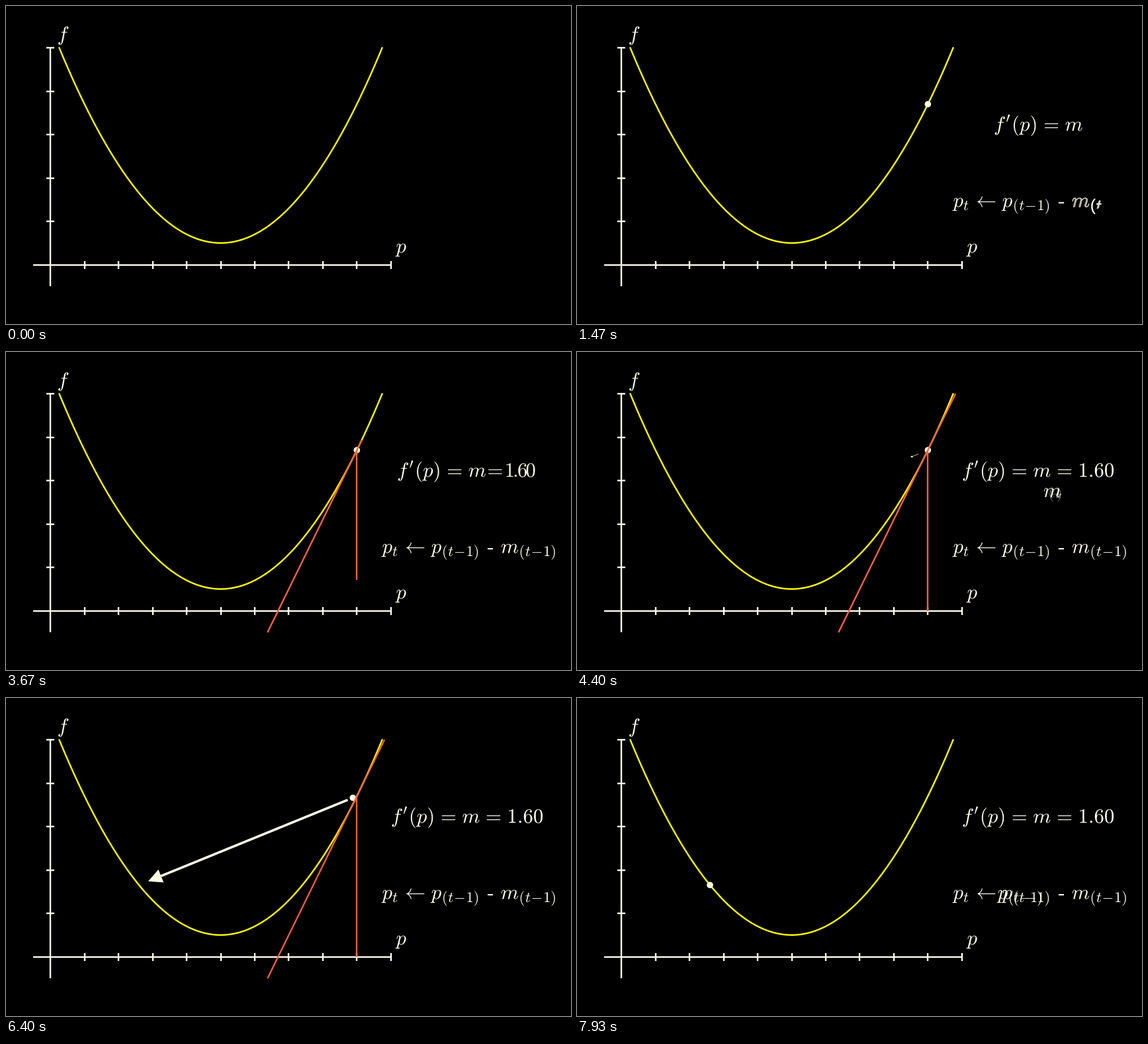
A matplotlib script that plays this animation: 854x480 px, repeating every 8 s.

```python
import math

import matplotlib
import numpy as np
import matplotlib.pyplot as plt
from matplotlib.animation import FuncAnimation
from matplotlib.patches import Circle, PathPatch, Polygon
from matplotlib.path import Path
from matplotlib.textpath import TextPath
from matplotlib.transforms import Affine2D

matplotlib.rcParams["mathtext.fontset"] = "cm"

WIDTH, HEIGHT, DPI = 854, 480, 64
LOOP, FRAMES = 8000, 200
STEP = LOOP // FRAMES
PX = 72 / DPI

WHITE, YELLOW, RED = "#ffffe6", "#ffff00", "#fc623e"
STROKE = 2.4
EM, SMALL = 30.8, 0.73
DOT_RADIUS = 4.8

fig = plt.figure(figsize=(WIDTH / DPI, HEIGHT / DPI), dpi=DPI, facecolor="black")
ax = fig.add_axes([0, 0, 1, 1])
ax.set_xlim(-0.5, WIDTH - 0.5)
ax.set_ylim(HEIGHT - 0.5, -0.5)
ax.axis("off")


def to_px(p, f):
    return np.array([66.7 + 51.46 * p, 390 - 65.5 * f])


def parabola(p):
    return 0.5 + 0.2 * (p - 5) ** 2


def smooth(t):
    t = min(max(t, 0), 1)
    edge = 1 / (1 + math.exp(5))
    value = 1 / (1 + math.exp(-10 * (t - 0.5)))
    return min(max((value - edge) / (1 - 2 * edge), 0), 1)


def progress(now, start, duration):
    return smooth((now - start) / duration)


def lerp(a, b, u):
    return a + (b - a) * u


# ---- glyphs -------------------------------------------------------------

BEARING = {"=": 0.056, r"\leftarrow": 0.057, "-": 0.083}
shapes = {}


def shape(tex, scale):
    """Outline of one symbol with its origin at the baseline, y upwards."""
    key = tex, scale
    if key not in shapes:
        size = EM * scale
        if tex == "hyphen":
            x0, x1, y0, y1 = np.array([0.011, 0.29, 0.187, 0.247]) * size
            path = Path([(x0, y0), (x1, y0), (x1, y1), (x0, y1), (x0, y0)],
                        closed=True)
        else:
            text = TextPath((0, 0), f"${tex}$", size=size)
            path = Path(text.vertices, text.codes)
            if tex in BEARING:
                shift = BEARING[tex] * size - path.get_extents().x0
                path = path.transformed(Affine2D().translate(shift, 0))
        shapes[key] = path
    return shapes[key]


def row(symbols, x, y):
    """Place (tex, offset, scale, rise) symbols, given in em, on a baseline."""
    return [(tex, scale, np.array([x + dx * EM, y - rise * EM]))
            for tex, dx, scale, rise in symbols]


def subscript(start):
    parts = zip(["(", "t", "-", "1", ")"], [0.01, 0.315, 0.6, 1.2, 1.56])
    return [(tex, start + dx, SMALL, -0.15) for tex, dx in parts]


SLOPE = [("f", 0, 1, 0), (r"\prime", 0.6, 0.7, 0.413), ("(", 0.878, 1, 0),
         ("p", 1.267, 1, 0), (")", 1.77, 1, 0), ("=", 2.437, 1, 0),
         ("m", 3.493, 1, 0)]
VALUE = [("=", 4.649, 1, 0), ("1", 5.705, 1, 0), (".", 6.205, 1, 0),
         ("6", 6.483, 1, 0), ("0", 6.983, 1, 0)]
UPDATE = ([("p", 0, 1, 0), ("t", 0.503, SMALL, -0.15),
           (r"\leftarrow", 1.132, 1, 0), ("p", 2.41, 1, 0)]
          + subscript(2.925)
          + [("hyphen", 5.153, 1, 0), ("m", 5.825, 1, 0)] + subscript(6.71))

slope_wide = row(SLOPE, 629.5, 188)
slope_left = row(SLOPE, 581.3, 188)
value_row = row(VALUE, 581.3, 188)
update_row = row(UPDATE, 568, 303)
previous_p, last_m = update_row[3:9], update_row[10:]


# ---- drawing ------------------------------------------------------------

live = []


def keep(artist):
    live.append(artist)
    return artist


def draw_glyph(glyph, at=None, alpha=1, border=0):
    tex, scale, home = glyph
    x, y = home if at is None else at
    path = shape(tex, scale).transformed(Affine2D().scale(1, -1).translate(x, y))
    patch = PathPatch(path, facecolor=WHITE, edgecolor=WHITE,
                      lw=border * PX, alpha=alpha, zorder=5)
    return keep(ax.add_patch(patch))


def draw_row(glyphs):
    for glyph in glyphs:
        draw_glyph(glyph)


def draw_outline(glyph, u):
    tex, scale, (x, y) = glyph
    for points in shape(tex, scale).to_polygons():
        part = points[:max(2, round(len(points) * u))]
        draw_line(x + part[:, 0], y - part[:, 1], WHITE, 1.2, 5)


def draw_line(xs, ys, color, width=STROKE, zorder=4, alpha=1):
    line, = ax.plot(xs, ys, color=color, lw=width * PX, zorder=zorder,
                    alpha=alpha, solid_capstyle="butt")
    return keep(line)


def draw_dot(center, radius=DOT_RADIUS, alpha=1):
    keep(ax.add_patch(Circle(center, radius, color=WHITE, lw=0,
                             alpha=alpha, zorder=3)))


def write(glyphs, u, lag=0.2):
    """Trace each border, then fill it, one symbol after another."""
    head = u * (1 + lag * (len(glyphs) - 1))
    for i, glyph in enumerate(glyphs):
        own = min(head - lag * i, 1)
        if own >= 0.5:
            fill = 2 * own - 1
            draw_glyph(glyph, alpha=lerp(0.5, 1, fill), border=1.2 * (1 - fill))
        elif own > 0:
            draw_outline(glyph, 2 * own)


def spread(glyphs, origin, u):
    """Symbols fan out of one point to their places while fading in."""
    for glyph in glyphs:
        draw_glyph(glyph, lerp(origin, glyph[2], u), alpha=min(1, 0.15 + u))


def draw_partial(a, b, u, alpha):
    end = lerp(a, b, u)
    draw_line([a[0], end[0]], [a[1], end[1]], RED, alpha=alpha)


def draw_arrow(a, b, u, alpha):
    direction = (b - a) / np.hypot(*(b - a))
    normal = np.array([-direction[1], direction[0]])
    length = np.hypot(*(b - a)) * u
    tip = min(21, length / 4)
    point = a + direction * length
    base = point - direction * tip
    width = min(3.6, length / 20)
    draw_line([a[0], base[0]], [a[1], base[1]], WHITE, width, 6, alpha)
    corners = [point, base + normal * tip / 2, base - normal * tip / 2]
    keep(ax.add_patch(Polygon(corners, color=WHITE, lw=0, alpha=alpha, zorder=6)))


# ---- fixed parts --------------------------------------------------------

def draw_graph():
    ox, oy = to_px(0, 0)
    right, top = to_px(10, 5)
    left, bottom = to_px(-0.5, -0.5)
    draw_line([left, right + 1], [oy, oy], WHITE, zorder=1)
    draw_line([ox, ox], [bottom, top - 1], WHITE, zorder=1)
    for i in range(1, 11):
        x = to_px(i, 0)[0]
        draw_line([x, x], [oy - 6, oy + 6], WHITE, zorder=1)
    for i in range(1, 6):
        y = to_px(0, i)[1]
        draw_line([ox - 6, ox + 6], [y, y], WHITE, zorder=1)
    p = np.linspace(0.25, 9.75, 200)
    draw_line(*to_px(p, parabola(p)), YELLOW, zorder=2)
    draw_row(row([("f", 0, 1, 0)], 77, 52) + row([("p", 0, 1, 0)], 589, 372))


draw_graph()
live.clear()

old_dot = to_px(9, parabola(9))
new_dot = to_px(2.6, parabola(2.6))
foot = to_px(9, 0)
tangent_low = to_px(9 - 4.2 / 1.6, -0.5)
tangent_high = to_px(9 + 1.3 / 1.6, 5)
gap = 15 * (new_dot - old_dot) / np.hypot(*(new_dot - old_dot))


# ---- timeline -----------------------------------------------------------

def draw_slope(now):
    u = progress(now, 3000, 1000)
    if now < 3000:
        write(slope_wide, progress(now, 0, 930))
        return
    for glyph, target in zip(slope_wide, slope_left):
        draw_glyph(glyph, lerp(glyph[2], target[2], u))
    if u > 0:
        spread(value_row, slope_wide[-1][2], u)


def draw_update(now):
    if now < 1870:
        write(update_row, progress(now, 870, 1000))
        return
    draw_row(update_row)
    if 4000 < now < 5000:
        u = progress(now, 4000, 1000)
        source = slope_left[-1][2]
        draw_glyph(last_m[0], lerp(source, last_m[0][2], u))
        spread(last_m[1:], source, u)
    if now > 7200:
        u = progress(now, 7200, 1000)
        draw_glyph(previous_p[0], lerp(update_row[0][2], previous_p[0][2], u))
        spread(previous_p[1:], update_row[1][2], u)


def draw_dots(now):
    if now < 7270:
        move = progress(now, 6267, 1000)
        radius = DOT_RADIUS * progress(now, 0, 930)
        draw_dot(lerp(old_dot, new_dot, move), radius)
    if now > 6267:
        draw_dot(new_dot, alpha=progress(now, 6200, 800))


def draw_step(now):
    u = progress(now, 3000, 1000)
    alpha = 1 - progress(now, 6200, 930)
    if u > 0 and alpha > 0:
        draw_partial(tangent_low, tangent_high, u, alpha)
        draw_partial(old_dot, foot, u, alpha)
    grown = progress(now, 4000, 2000)
    shown = 1 - progress(now, 7200, 720)
    if grown > 0 and shown > 0:
        draw_arrow(old_dot + gap, new_dot - gap, grown, shown)


def update(frame):
    while live:
        live.pop().remove()
    now = frame * STEP
    draw_slope(now)
    draw_update(now)
    draw_dots(now)
    draw_step(now)
    return live


animation = FuncAnimation(fig, update, frames=FRAMES, interval=STEP,
                          init_func=lambda: [], repeat=True, repeat_delay=0,
                          blit=False)
plt.show()
```
